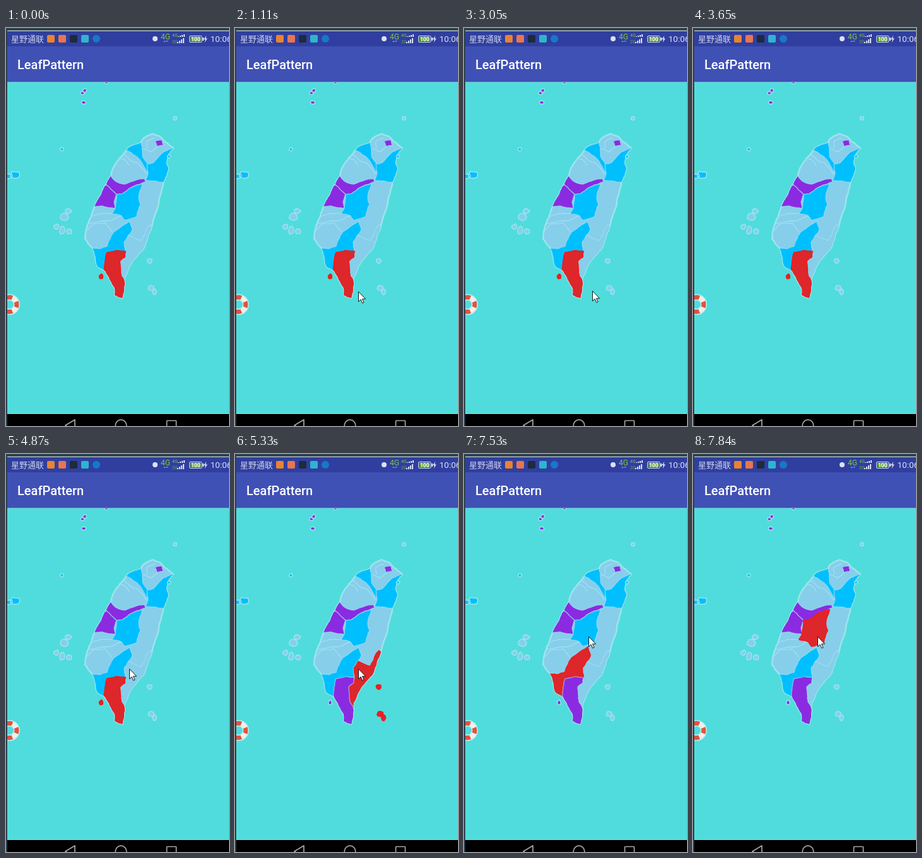
Write an HTML page that moves like this. It is 353 by 629 pixels and loops after 8 s.

```html
<!DOCTYPE html>
<html lang="en">
<head>
<meta charset="utf-8">
<title>Map selection</title>
<style>
  html, body { margin: 0; width: 100%; height: 100%; overflow: hidden; background: #50dcdc; }
  svg { display: block; width: 100vw; height: 100vh; }
  text { font-family: Roboto, "Noto Sans CJK SC", "Noto Sans CJK", sans-serif; }
  #map path { stroke-linejoin: round; }
  #coast { fill: #87ceeb; stroke: #9de5ec; stroke-width: 2.4; }
  #regions path { stroke: #a4e2f4; stroke-width: 1.2; stroke-opacity: .7; }
  #islets path { stroke: #9de5ec; stroke-width: 1.4; }
  #lines { fill: none; stroke: #a4e2f4; stroke-width: 1.1; }
  #map .picked { fill: #dd272a; stroke: #f01c1c; stroke-width: 2; stroke-opacity: 1; }
</style>
</head>
<body>
<svg viewBox="0 0 353 629" preserveAspectRatio="none">
  <defs><clipPath id="land"><path id="landShape"/></clipPath></defs>
  <rect width="353" height="629" fill="#50dcdc"/>

  <g id="map">
    <path id="coast"/>
    <path id="lines"/>
    <g id="regions" clip-path="url(#land)"></g>
    <g id="islets"></g>
  </g>

  <g id="buoy" transform="translate(5.5 437)" fill="none">
    <circle r="11.5" stroke="#b9eeee" stroke-width="10"/>
    <circle r="11.5" stroke="#f3eeea" stroke-width="7"/>
    <circle r="11.5" stroke="#e2523f" stroke-width="7" pathLength="8" stroke-dasharray="1" stroke-dashoffset=".5"/>
  </g>

  <g id="bars">
    <rect y="29" width="353" height="56" fill="#3f51b5"/>
    <rect y="85" width="353" height="1" fill="#72b9cf"/>
    <rect y="5" width="353" height="24" fill="#303f9f"/>
    <rect width="353" height="4" fill="#2d4450"/>
    <rect y="4" width="353" height="1" fill="#dfe6ea"/>
    <rect y="610" width="353" height="19" fill="#000"/>
    <rect y="609" width="353" height="1" fill="#8fdcdd"/>
    <rect width="2" height="629" fill="#2d404e"/>
  </g>
  <text x="18" y="65" font-size="20" font-weight="500" fill="#fff">LeafPattern</text>

  <g id="status" fill="#dce0f4">
    <text x="8" y="22" font-size="13" fill="#cdd2ec">星野通联</text>
    <g id="apps"></g>
    <circle cx="236" cy="17" r="4"/>
    <g fill="#7fc241">
      <text x="245" y="18" font-size="12">4G</text>
      <text x="263" y="14" font-size="7">4G</text>
      <text x="263" y="24" font-size="7" fill="#6ba85c">2G</text>
    </g>
    <path d="M249 22l2-2 2 2zM253 20h4l-2 2z" fill="#8f9cc9"/>
    <g id="signal"></g>
    <rect x="290.5" y="12.5" width="19.5" height="10" rx="1.5" fill="none" stroke="#dce0f4"/>
    <rect x="311" y="15" width="2" height="5"/>
    <rect x="292" y="14" width="16.5" height="7" fill="#5fa83a"/>
    <text x="300.2" y="20.7" font-size="8.5" font-weight="700" text-anchor="middle" fill="#fff">100</text>
    <path d="M317 12l-4 6h2.6l-1 5 4.2-6.5h-2.6z"/>
    <text x="323.5" y="22" font-size="13.5">10:06</text>
  </g>

  <g id="nav" fill="none" stroke="#a6a6a6" stroke-width="1.7">
    <path d="M109 637V619L94 628Z" stroke-linejoin="round"/>
    <circle cx="182" cy="628" r="8.8"/>
    <rect x="254.5" y="620.5" width="15" height="15" rx="1"/>
  </g>

  <path id="cursor" d="M.5.7V16.5L4.1 13.1 6.7 18.8 9 17.8 6.5 12.2H11.6Z" fill="#fff" stroke="#14181c"/>
</svg>

<script>
const LOOP = 8000;
const LIGHT = '#87ceeb', BLUE = '#00bfff', PURPLE = '#8a2be2';

const node = id => document.getElementById(id);

function add(parent, tag, attrs) {
  const el = document.createElementNS('http://www.w3.org/2000/svg', tag);
  for (const key in attrs) el.setAttribute(key, attrs[key]);
  node(parent).append(el);
  return el;
}

// Repeatable noise in -1..1
const noise = seed => {
  const v = Math.sin(seed * 12.9898) * 43758.5453;
  return (v - Math.floor(v)) * 2 - 1;
};

const parse = text => text.split(' ').map(pair => pair.split(',').map(Number));

// Splits an edge with small bends that depend only on its two ends,
// so that neighbours sharing an edge also share its bends.
function bend(a, b, out) {
  const dx = b[0] - a[0], dy = b[1] - a[1], length = Math.hypot(dx, dy);
  if (length > 6) {
    const side = a[0] + a[1] / 1000 < b[0] + b[1] / 1000 ? 1 : -1;
    const shift = side * noise(a[0] + b[0] + 3 * (a[1] + b[1])) * Math.min(1.2, length * .07) / length;
    const mid = [(a[0] + b[0]) / 2 - dy * shift, (a[1] + b[1]) / 2 + dx * shift];
    bend(a, mid, out);
    bend(mid, b, out);
  } else {
    out.push(b);
  }
}

function rough(text, closed = true) {
  const points = parse(text), out = [points[0]];
  for (let i = 1; i < points.length; i++) bend(points[i - 1], points[i], out);
  if (closed) bend(points.at(-1), points[0], out);
  return 'M' + out.map(p => p.map(v => v.toFixed(1))).join('L') + (closed ? 'Z' : '');
}

function blob(x, y, rx, ry) {
  const points = Array.from({ length: 9 }, (_, i) => {
    const angle = i / 9 * 2 * Math.PI, r = 1 + .22 * noise(x + y + i);
    return [x + rx * r * Math.cos(angle), y + ry * r * Math.sin(angle)];
  });
  return 'M' + points.join('L') + 'Z';
}

const coast = rough('232,167 243,171 252,180 265,190 257,199 254,215 257,221 249,244 238,290 226,325 217,350 200,369 188,393 187,415 184,427 172,422 172,411 157,384 145,377 136,347 125,333 129,311 140,283 152,259 166,234 169,222 178,209 187,198 194,189 214,181 217,175');
node('coast').setAttribute('d', coast);
node('landShape').setAttribute('d', coast);

// Inner borders of the light areas
node('lines').setAttribute('d', [
  '217,190 229,196 240,188', '224,190 223,179 236,174', 
  '187,200 198,210 208,213 222,231', '181,206 188,208 195,217',
  '134,297 150,293 168,293', '130,309 148,306 167,304 183,297', '127,321 137,310 157,308 168,322',
].map(line => rough(line, false)).join(''));

// Outlines may run past the shore, the land clips them.
const regions = {
  harbour: [PURPLE, '236,179 247,177 249,185 239,187'],
  northWest: [BLUE, '214,181 217,205 224,214 223,230 214,211 205,202 190,193 194,183'],
  northEast: [BLUE, '264,190 249,196 233,213 223,215 225,230 221,241 249,244 270,230 270,190'],
  middle: [PURPLE, '166,234 173,242 188,247 207,240 219,238 221,243 198,252 184,262 175,263 159,248 150,240'],
  westCoast: [PURPLE, '159,248 175,263 171,275 173,285 152,281 130,283 145,255'],
  heart: [BLUE, '175,263 184,262 198,252 216,246 210,268 213,279 207,298 188,304 183,297 168,293 173,285'],
  southEast: [LIGHT, '228,311 240,320 205,385 187,400 182,392 180,368 188,362 189,353 187,338 192,327 214,336 224,315'],
  southWest: [BLUE, '196,305 200,319 187,338 189,353 160,355 156,383 140,385 125,347 148,349 160,345 170,323 181,315'],
  south: [PURPLE, '160,355 174,352 189,353 188,362 180,368 182,392 187,400 192,430 165,430 156,383 157,368'],
};

const islets = [
  ['southEast', LIGHT, [[227, 368, 3.5, 3.5], [230, 411, 5, 4], [235, 417, 3, 4]]],
  ['south', PURPLE, [[150.5, 393, 2.6, 3.5]]],
  ['far', PURPLE, [[124.5, 99, 3, 2.8], [121, 103, 3, 2.5], [123, 118, 3.4, 2.8], [159, 86, 3, 2]]],
  ['far', BLUE, [[4, 234, 6, 3.6], [14, 232, 7, 5.5], [88.5, 192, 2.6, 2.6], [258, 203, 2.4, 2.4]]],
  ['far', LIGHT, [[267.5, 143, 3, 3], [98, 289, 5, 4], [93, 299, 7, 6], [80, 314, 4, 4], [89, 320, 4, 6], [100, 322, 4, 4]]],
];

const areas = [
  ...Object.entries(regions).map(([name, [fill, outline]]) =>
    ({ name, el: add('regions', 'path', { d: rough(outline), fill }) })),
  ...islets.map(([name, fill, parts]) =>
    ({ name, el: add('islets', 'path', { d: parts.map(p => blob(...p)).join(''), fill }) })),
];

['#e98332', '#e8754f', '#1e2b3c', '#2fb4cf', '#1878c8'].forEach((fill, i) =>
  add('apps', 'rect', { x: 65 + 18 * i, y: 11, width: 12, height: 12, rx: i < 4 ? 2 : 6, fill }));

for (let i = 0; i < 4; i++) {
  add('signal', 'rect', { x: 271 + 3 * i, y: 22 - 2 * i, width: 2, height: 2 + 2 * i });
  add('signal', 'rect', { x: 272 + 3 * i, y: 13 - i, width: 2, height: 1 + i });
}

const picks = [[0, 'south'], [5330, 'southEast'], [6770, 'southWest'], [7840, 'heart']];

const linear = p => p;
const easeOut = p => 1 - (1 - p) ** 3;

// Pointer moves: start, end, jumps, from, to, easing
const moves = [
  [840, 1260, 3, [189, 547], [197, 361], easeOut],
  [1260, 1500, 2, [197, 361], [197, 357], linear],
  [1970, 2120, 1, [199, 349], [200, 347], linear],
  [3050, 3200, 1, [203, 415], [222, 490], linear],
  [3350, 3500, 1, [227, 470], [247, 506], linear],
  [3960, 4260, 2, [271, 565], [232, 341], easeOut],
  [4410, 4870, 1, [194, 344], [195, 339], linear],
  [5950, 6190, 2, [194, 328], [193, 314], linear],
  [6500, 7230, 1, [189, 314], [191, 306], linear],
  [7380, 7530, 1, [196, 292], [197, 288], linear],
];
const isAway = t => t < 840 || (t >= 3650 && t < 3960);

const latest = (list, t) => list.findLast(([start]) => start <= t);

function pointerAt(t) {
  const [start, end, jumps, from, to, ease] = latest(moves, t);
  const progress = Math.min(1, (t - start) / (end - start));
  const k = ease(Math.floor(progress * jumps) / jumps);
  return from.map((v, i) => Math.round(v + (to[i] - v) * k));
}

function draw(t) {
  const [, pick] = latest(picks, t);
  for (const { name, el } of areas) el.classList.toggle('picked', name === pick);

  const away = isAway(t);
  node('cursor').setAttribute('visibility', away ? 'hidden' : 'visible');
  if (!away) node('cursor').setAttribute('transform', `translate(${pointerAt(t)})`);
}

function tick() {
  draw(performance.now() % LOOP);
  requestAnimationFrame(tick);
}
tick();
</script>
</body>
</html>
```
